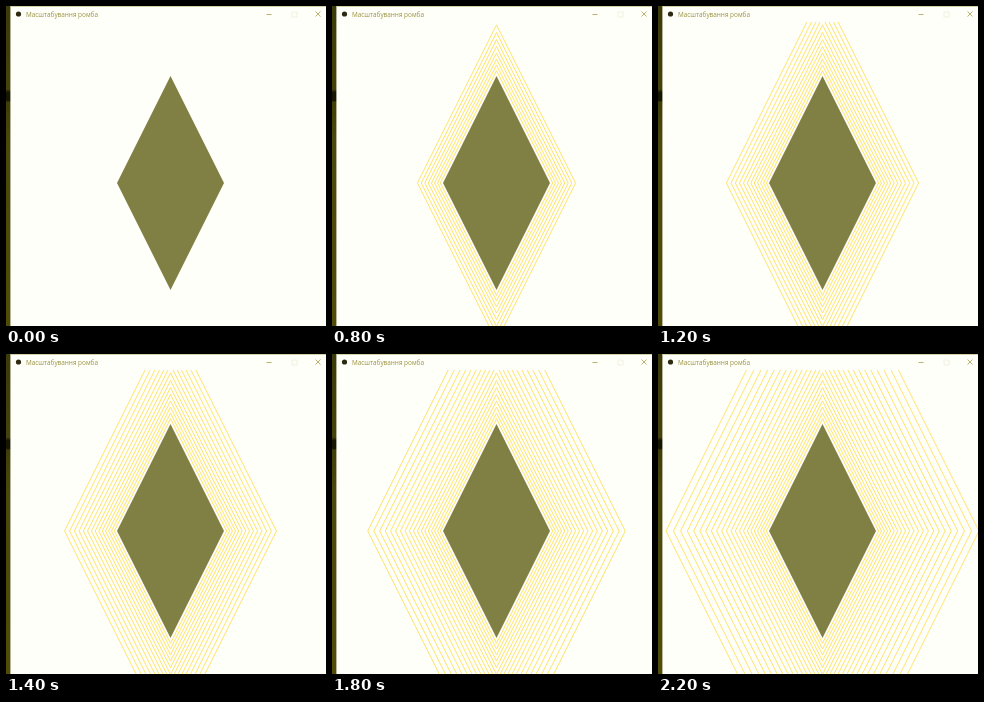
These frames come from a looping animation (320x320 px, 2300 ms). An HTML page:

```html
<!DOCTYPE html>
<html lang="uk">
<head>
<meta charset="utf-8">
<title>Масштабування ромба</title>
<style>
  html, body { margin: 0; width: 100%; height: 100%; overflow: hidden; background: #fffffa; }
  svg { display: block; width: 100vw; height: 100vh; }
  .title { font: 6.4px "Open Sans", "Noto Sans", sans-serif; fill: #99913f; }
  .buttons { fill: none; stroke: #a8a050; stroke-width: .8; }
  .rings { fill: none; stroke: #ffe36e; stroke-width: 1; }
</style>
</head>
<body>
<svg viewBox="0 0 320 320">
  <defs>
    <clipPath id="canvas"><rect x="5" y="16" width="315" height="304"/></clipPath>
    <linearGradient id="edge" x1="0" y1="0" x2="0" y2="1">
      <stop offset="0" stop-color="#3c3a08"/>
      <stop offset=".26" stop-color="#45420c"/>
      <stop offset=".27" stop-color="#151500"/>
      <stop offset=".295" stop-color="#151500"/>
      <stop offset=".3" stop-color="#403e08"/>
      <stop offset=".42" stop-color="#4a480c"/>
      <stop offset="1" stop-color="#504c08"/>
    </linearGradient>
  </defs>
  <rect width="320" height="320" fill="#fffffa"/>
  <rect width="4.4" height="320" fill="url(#edge)"/>
  <rect x="4.4" width="315.6" height=".8" fill="#c8c690"/>
  <circle cx="12.5" cy="8" r="2.6" fill="#2c2a10"/>
  <text class="title" x="20" y="10.7">Масштабування ромба</text>
  <g class="buttons">
    <path d="M260.5 8.5h5"/>
    <rect x="286" y="6" width="5" height="5" opacity=".2"/>
    <path d="M309.5 5.5l5 5m0-5l-5 5"/>
  </g>
  <g clip-path="url(#canvas)">
    <g class="rings" id="rings"></g>
    <polygon id="core" fill="#808044"/>
  </g>
</svg>
<script>
  const STEP = 100, STEPS = 23, GROWTH = 1.05;
  const CX = 164.5, CY = 177, HALF_W = 53.5, HALF_H = 107;

  const rhombus = k => {
    const w = HALF_W * k, h = HALF_H * k;
    return `${CX},${CY - h} ${CX + w},${CY} ${CX},${CY + h} ${CX - w},${CY}`;
  };

  document.getElementById('core').setAttribute('points', rhombus(1));

  const group = document.getElementById('rings');
  const rings = [];
  for (let n = 1; n < STEPS; n++) {
    const ring = document.createElementNS('http://www.w3.org/2000/svg', 'polygon');
    ring.setAttribute('points', rhombus(GROWTH ** n));
    group.append(ring);
    rings.push(ring);
  }

  // Each step leaves one more, 5% larger outline behind.
  function draw(time) {
    const step = Math.floor(Math.max(0, time) / STEP) % STEPS;
    rings.forEach((ring, i) => ring.style.display = i < step ? '' : 'none');
  }

  const start = performance.now();
  function tick() {
    draw(performance.now() - start);
    requestAnimationFrame(tick);
  }
  tick();
</script>
</body>
</html>
```
